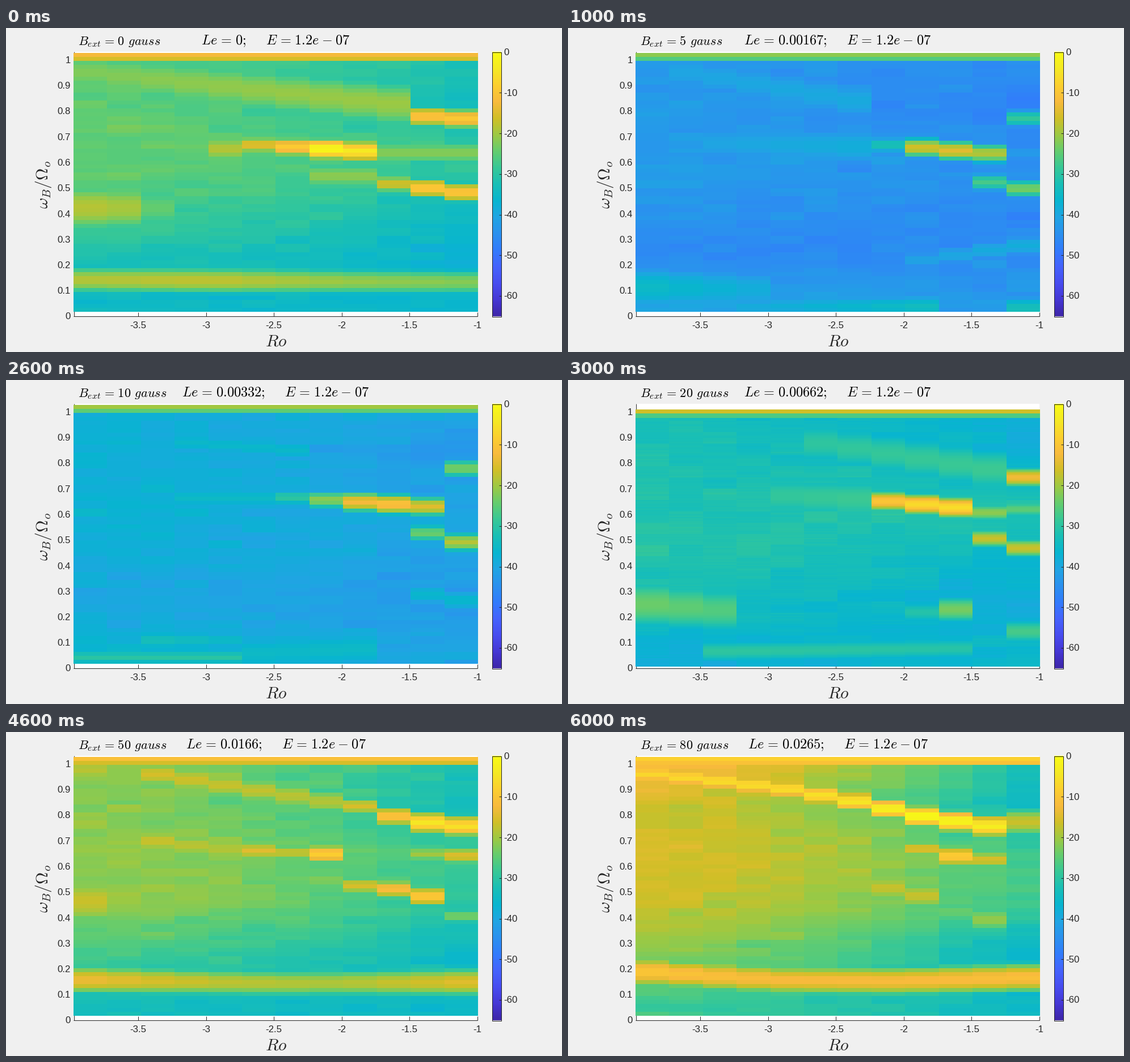
These frames come from a looping animation (980 px wide and 572 px high, 7 s). A matplotlib script:

```python
import numpy as np
import matplotlib.pyplot as plt
from matplotlib.animation import FuncAnimation
from matplotlib.colors import LinearSegmentedColormap
from matplotlib.patches import Rectangle

W, H, DPI = 980, 572, 100
PX = 72 / DPI
INK = "#262626"
LEFT, RIGHT, TOP, BASE = 119, 831, 42, 508.5
COLS = np.arange(12)
BLEND = (COLS / 11) ** 1.6
BG_Y = [62, 130, 220, 300, 390, 480]
SHARP, WIDE, SOFT = .075, .03, .008

CMAP = LinearSegmentedColormap.from_list("heat", (
    "#3e26a8 #4537d5 #484df0 #4563fd #327cfc #2b91ef #20a5e3 #08b5d0 #19bfb6 "
    "#37c897 #64cd6f #9dc943 #d1bf27 #f8ba3d #fccf30 #f5e924 #f9fb15").split())

shots = []


def spread(values, n):
    """Stretch a few values evenly over n columns."""
    return np.interp(np.linspace(0, 1, n), np.linspace(0, 1, len(values)), values)


def shot(gauss, le, band, left, right, crests, fine=False):
    """Spectrum map in dB: left/right profiles, texture and spectral crests.

    A crest is (first column, last column, heights, levels, sharpness).
    """
    top, bottom, rows = (52, 506, 182) if fine else (45, 501.5, 65)
    y = top + (np.arange(rows) + .5) * (bottom - top) / rows
    a, b = (np.interp(y, BG_Y, p)[:, None] for p in (left, right))
    z = a + (b - a) * BLEND
    rng = np.random.default_rng(gauss + 3)
    run = rows // 22
    patches = rng.normal(0, .7, (rows // run + 1, 12))
    z += np.repeat(patches, run, axis=0)[:rows] + rng.normal(0, .3, z.shape)
    for c0, c1, heights, levels, k in crests:
        n = c1 - c0 + 1
        rise = spread(levels, n) - k * (y[:, None] - spread(heights, n)) ** 2
        z[:, c0:c1 + 1] = np.maximum(z[:, c0:c1 + 1], rise)
    z[y < 66 if fine else y < 59] = band[1]
    z[y < 60.5 if fine else y < 52] = band[0]
    shots.append((gauss, le, z, (LEFT, RIGHT, bottom, top)))


shot(0, "0", (-12.5, -16),
     [-26, -25, -24.5, -25.5, -31, -35], [-32, -34, -29, -33, -37, -36],
     [(10, 11, [157, 161], [-10, -9.5], SHARP),
      (5, 8, [207, 218], [-14.5, -9, -1, -4], SHARP),
      (9, 11, [276, 291], [-16, -9, -9.5], SHARP),
      (0, 9, [80, 136], [-22.5, -21, -20.5], SOFT),
      (0, 2, [318], [-18.5, -19.5, -24.5], SOFT),
      (4, 4, [214], [-18.5], WIDE),
      (9, 11, [221], [-22], WIDE),
      (7, 8, [262], [-21.5], WIDE),
      (0, 11, [445, 449], [-18.5, -17.5, -20.5, -22], WIDE)])

shot(5, "0.00167", (-21.5, -26),
     [-43.5, -43, -42.5, -43, -46, -41], [-45, -48, -44, -46, -46, -43],
     [(11, 11, [160.5], [-29], SHARP),
      (7, 10, [207, 222], [-32, -16, -14.5, -18.5], SHARP),
      (10, 11, [273, 284.5], [-27, -23], SHARP),
      (0, 3, [459, 462], [-35, -38.5], SOFT),
      (3, 8, [492], [-39, -34], WIDE),
      (11, 11, [495], [-33], WIDE),
      (8, 11, [410, 385], [-41, -38.5], WIDE),
      (1, 6, [80, 130], [-40.5, -39.5], SOFT),
      (2, 6, [204, 210], [-40.5, -38.5], SOFT)])

shot(10, "0.00332", (-20, -25),
     [-38, -38, -37.5, -38, -40, -36.5], [-41, -43, -41, -41, -43, -41],
     [(11, 11, [157], [-23], SHARP),
      (6, 10, [208, 224], [-29.5, -21.5, -12.5, -10.5, -15], SHARP),
      (10, 11, [271, 287], [-24, -18.5], SHARP),
      (0, 4, [490], [-30], SHARP),
      (2, 4, [460], [-33, -35], WIDE),
      (5, 8, [483, 475], [-35], SOFT),
      (3, 6, [112, 125], [-35.5], WIDE),
      (3, 5, [209], [-35], WIDE),
      (10, 11, [380, 390], [-36], WIDE)])

shot(20, "0.00662", (-16.5, -26.5),
     [-33, -32, -31.5, -31, -33, -38], [-38, -38, -31, -35, -39, -36],
     [(7, 9, [214, 225], [-10, -6.5, -6], SHARP),
      (10, 11, [234, 228], [-21.5, -25], SHARP),
      (10, 11, [280, 297], [-17], SHARP),
      (11, 11, [172], [-13], SHARP),
      (0, 2, [396, 406], [-24, -26], SOFT),
      (2, 9, [479, 474], [-29.5, -30.5], WIDE),
      (8, 9, [410, 405], [-31, -23], WIDE),
      (5, 10, [112, 158], [-29.5, -28], SOFT),
      (4, 6, [205, 210], [-29, -28], SOFT),
      (11, 11, [444], [-27], WIDE)], fine=True)

shot(50, "0.0166", (-11, -16),
     [-21, -22, -21, -21, -27, -34], [-32, -33.5, -28, -30, -35, -35],
     [(8, 11, [132, 150, 161, 167], [-15.5, -10, -4.5, -5.5], SHARP),
      (4, 7, [207, 216], [-18, -14.5, -17, -8.5], SHARP),
      (8, 10, [272, 278, 291], [-15.5, -11.5, -9], SHARP),
      (10, 11, [216, 219], [-20, -15], SHARP),
      (2, 7, [76, 124], [-16, -18.5], WIDE),
      (2, 4, [193, 209], [-17, -19], WIDE),
      (0, 0, [300], [-17], SOFT),
      (0, 0, [68], [-18], WIDE),
      (11, 11, [326], [-23], SHARP),
      (0, 11, [438, 444, 442], [-13.5, -17.5, -19, -15], WIDE)])

shot(60, "0.0199", (-10.5, -15),
     [-18, -20, -18.5, -19, -26, -31], [-32, -34, -27, -29, -35, -33],
     [(0, 8, [75, 136], [-13.5, -11, -11.5, -9.5], WIDE),
      (9, 11, [153, 171], [-2.5, -3, -6.5], SHARP),
      (4, 7, [207, 215], [-13.5, -16], WIDE),
      (9, 11, [207, 227], [-17, -9.5, -18.5], SHARP),
      (8, 9, [274, 284], [-17.5, -10.5], SHARP),
      (0, 3, [186, 205], [-17], SOFT),
      (11, 11, [330], [-19], SHARP),
      (0, 11, [433, 440, 443], [-11.5, -15, -17, -13], WIDE)])

shot(80, "0.0265", (-8, -10.5),
     [-12, -16.5, -15.5, -17, -22, -28], [-32, -35, -27, -28, -36, -35],
     [(0, 10, [76, 88, 102, 124, 150, 167], [-7, -6, -6, -4.5, -.5, -3], SHARP),
      (11, 11, [160], [-17], WIDE),
      (8, 10, [207, 220, 226], [-15, -8.5, -15.5], SHARP),
      (7, 8, [276, 290], [-17], WIDE),
      (10, 10, [332], [-21], WIDE),
      (0, 1, [272, 290], [-15.5], SOFT),
      (0, 11, [424, 438, 440, 434], [-10, -12, -12, -11], WIDE)])


plt.rcParams["mathtext.fontset"] = "cm"
fig = plt.figure(figsize=(W / DPI, H / DPI), dpi=DPI, facecolor="#f0f0f0")
ax = fig.add_axes([0, 0, 1, 1])


def line(xs, ys, z=1):
    ax.plot(xs, ys, color=INK, lw=PX, zorder=z, solid_capstyle="butt")


def label(x, y, s, size=16.7, **kw):
    opts = dict(color=INK, family="Liberation Sans", va="baseline", zorder=5)
    return ax.text(x, y, s, fontsize=size * PX, **{**opts, **kw})


def picture(data, extent, cmap, **kw):
    return ax.imshow(data, extent=extent, cmap=cmap, aspect="auto",
                     interpolation="nearest", zorder=2, **kw)


ax.add_patch(Rectangle((LEFT, TOP), RIGHT - LEFT, BASE - TOP, color="white", lw=0, zorder=0))
line([LEFT + .5] * 2, [TOP, BASE])
line([LEFT, RIGHT], [BASE] * 2)
for i in range(6):
    x = RIGHT - .5 - 119.5 * i
    line([x, x], [BASE - 7, BASE])
    label(x, 530.5, f"{-1 - i / 2:g}", ha="center")
for i in range(11):
    label(114, BASE - 45.25 * i + 6, f"{i / 10:g}", ha="right")

heat = picture(shots[0][2], shots[0][3], CMAP, vmin=-65.1, vmax=0)
picture(np.linspace(0, 1, 256)[:, None], (856.5, 872.5, 509.5, 42.5), CMAP.reversed())
ax.add_patch(Rectangle((856.5, 42.5), 16, 467, fill=False, ec=INK, lw=PX, zorder=3))
for i in range(7):
    y = 42.5 + 71.75 * i
    line([868.5, 872.5], [y, y], 3)
    label(877, y + 5.5, f"{-10 * i}")

EQ = r"\hspace{0.12}=\hspace{0.12}"
label(476, 561, "$Ro$", 29.6, ha="center")
label(74, 276, r"$\omega_B/\Omega_o$", 29.6, ha="center", rotation=90,
      rotation_mode="anchor")
field_text = label(126.5, 30.5, "", 22.3, color="black")
number_text = label(475.5, 29, "", 24.3, color="black", ha="center")

ax.set_xlim(0, W)
ax.set_ylim(H, 0)
ax.axis("off")


def draw(i):
    gauss, le, z, extent = shots[i]
    heat.set_data(z)
    heat.set_extent(extent)
    field_text.set_text(rf"$B_{{ext}}{EQ}{gauss}\hspace{{0.38}}gauss$")
    number_text.set_text(
        rf"$Le{EQ}{le};\hspace{{1.45}}E{EQ}1.2e\hspace{{0.05}}-\hspace{{0.05}}07$")
    return heat, field_text, number_text


anim = FuncAnimation(fig, draw, frames=len(shots), interval=1000, repeat=True)
plt.show()
```
